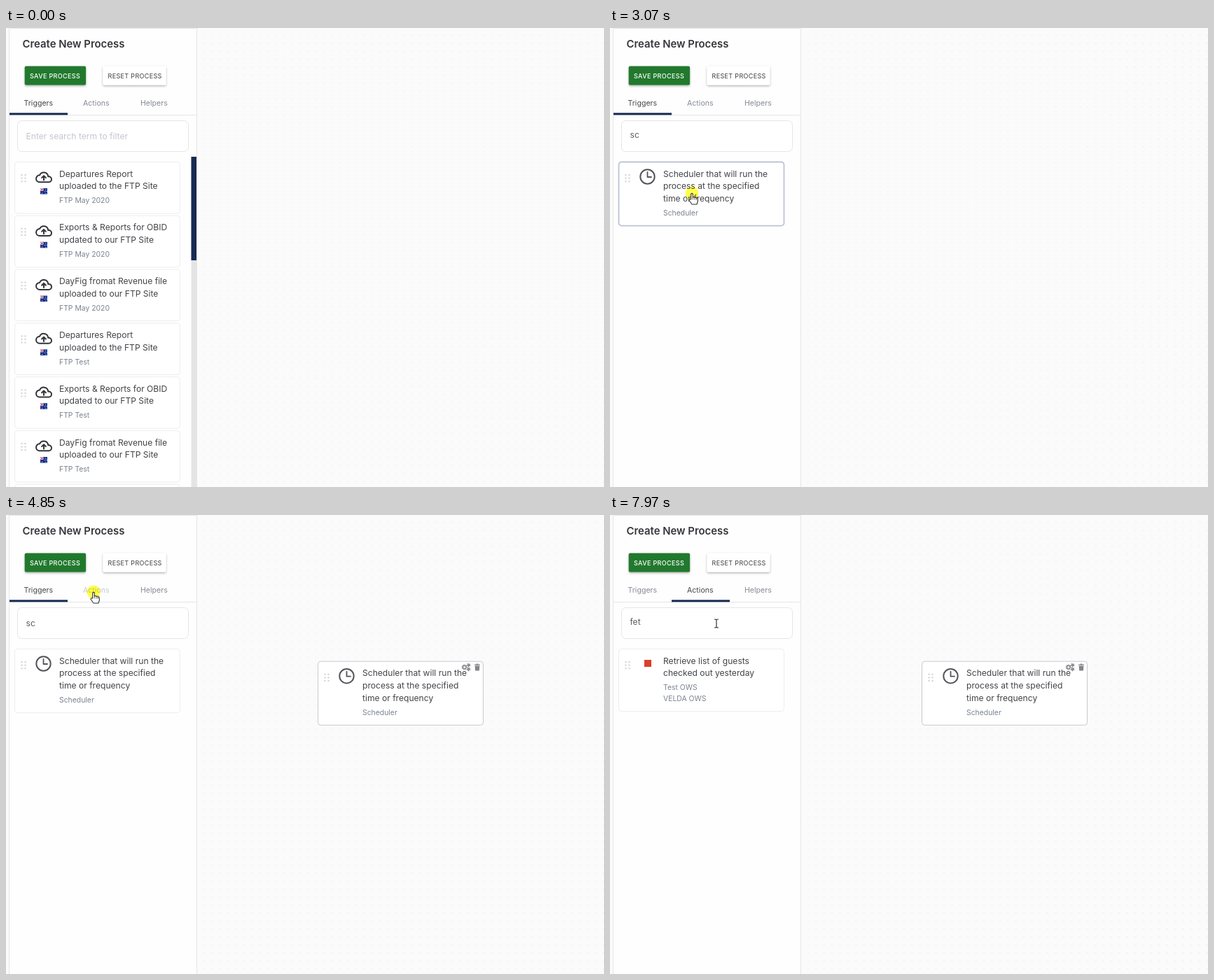
An HTML page for the animation above (8 s loop, 854 px wide and 656 px high).

```html
<!DOCTYPE html>
<html lang="en">
<head>
<meta charset="utf-8">
<title>Create New Process</title>
<style>
  html, body { margin: 0; width: 100%; height: 100%; overflow: hidden; background: #fbfbfb; }
  svg { display: block; font-family: Inter, "Open Sans", sans-serif; }
  .title { font-size: 12.1px; fill: #434448; }
  .sub { font-size: 10.4px; fill: #7b8290; }
  .tab { font-size: 10.6px; fill: #858a93; }
  .button { font-size: 9px; letter-spacing: .35px; }
  .line { fill: none; stroke-linecap: round; stroke-linejoin: round; }
</style>
</head>
<body>
<svg width="854" height="656" viewBox="0 0 854 656">
  <defs>
    <pattern id="dots" width="11.4" height="11.4" patternUnits="userSpaceOnUse">
      <rect x="8.6" y="9.4" width="1.5" height="1.5" fill="#eeeeef"/>
    </pattern>
    <filter id="lift" x="-10%" y="-20%" width="120%" height="160%">
      <feDropShadow dx="0" dy="1.5" stdDeviation="1.5" flood-opacity=".32"/>
    </filter>
  </defs>
  <rect width="854" height="656" fill="#fbfbfb"/>
  <rect x="273" width="581" height="656" fill="url(#dots)"/>
  <path d="M5 0H272V656H5z" fill="#fefefe"/>
  <path d="M4.5 656V.5H272.5V656M5 124.5H272" fill="none" stroke="#e6e6e8"/>
  <text x="23.5" y="28" font-size="14.9" font-weight="600" fill="#35363a">Create New Process</text>
  <g class="button" font-weight="500">
    <rect x="26.7" y="54.5" width="87.4" height="27" rx="2" fill="#23792f" filter="url(#lift)"/>
    <text x="34" y="72" fill="#fff">SAVE PROCESS</text>
  </g>
  <g class="button">
    <rect x="138.5" y="54.5" width="90" height="27" rx="2" fill="#fff" filter="url(#lift)"/>
    <text x="145.5" y="72" fill="#3c3c3f">RESET PROCESS</text>
  </g>
  <rect x="16.5" y="132.5" width="244" height="44" rx="6" fill="#fff" stroke="#e5e5e8"/>
  <g id="scene"></g>
</svg>
<script>
const LOOP = 8000;
const scene = document.getElementById('scene');

const text = (x, y, cls, s, extra = '') => `<text x="${x}" y="${y}" class="${cls}" ${extra}>${s}</text>`;
const rect = (x, y, w, h, fill) => `<rect x="${x}" y="${y}" width="${w}" height="${h}" fill="${fill}"/>`;
const line = (d, color, width) => `<path class="line" d="${d}" stroke="${color}" stroke-width="${width}"/>`;
const at = (x, y, body, extra = '') => `<g transform="translate(${x} ${y})" ${extra}>${body}</g>`;

// Icons are drawn where they sit in the topmost card.
const flag = rect(49, 229, 10, 8.5, '#14318c') + rect(49, 229, 4.5, 4, '#e8d5df') +
  line('M49.5 229.5l3.5 3M53 229.5l-3.5 3', '#c8324c', .9) +
  [[51, 235.6], [56.3, 230.6], [57.7, 233], [55.2, 233.2], [56.5, 236]]
    .map(([x, y]) => rect(x, y, 1, 1, '#fff')).join('');
const icons = {
  cloud: at(42, 201.3, line('M6 19h13a4 4 0 0 0 0-8h-.8A6.3 6.3 0 0 0 6.1 9A5 5 0 0 0 6 19z', '#333438', 2) +
    line('M12 16.2V10m-2.9 2.8L12 9.9l2.9 2.9', '#333438', 2)) + flag,
  clock: '<circle cx="53.5" cy="212.5" r="10.2" fill="none" stroke="#56545a" stroke-width="2"/>' +
    line('M53.5 206V213H59', '#56545a', 1.8),
  hook: line('M43.5 207.5H64.5V220.5H43.5zM43.5 211H50M58 211H64.5M49.5 207v-2.5h8.5v2.5', '#36373b', 1.7) +
    line('M54 208v5a2.8 2.8 0 1 1-3.5 2.5', '#36373b', 1.6),
  badge: rect(49, 207, 10, 10, '#d8402c')
};
const grip = [0, 1, 2, 3, 4, 5]
  .map(i => rect(21.5 + i % 2 * 5, 209 + (i >> 1) * 4.6, 2, 2, '#cfcfd3')).join('');

const item = (icon, titles, subs) => ({
  icon, titles, subs, height: 23.3 + 17.6 * titles.length + 15.5 * subs.length
});
const uploads = ['FTP May 2020', 'FTP Test', 'FTP Test'].flatMap(site => [
  item('cloud', ['Departures Report', 'uploaded to the FTP Site'], [site]),
  item('cloud', ['Exports &amp; Reports for OBID', 'updated to our FTP Site'], [site]),
  item('cloud', ['DayFig fromat Revenue file', 'uploaded to our FTP Site'], [site])
]).slice(0, 7);
const scheduler = item('clock', ['Scheduler that will run the', 'process at the specified', 'time or frequency'], ['Scheduler']);
const publish = item('hook', ['Publish Event'], ['Test Webhook', 'mlinkers Webhook Subscriber']);
const guests = (...titles) => item('badge', titles, ['Test OWS', 'VELDA OWS']);
const checkedOut = guests('Retrieve list of guests', 'checked out yesterday');
const broad = [
  checkedOut, guests('Retrieve list of guests', 'checked in yesterday'),
  guests('Retrieve profile of guest', 'for a reservation'), guests('Find a reservation', 'for today'),
  guests('Retrieve list of guests', 'arriving today'), guests('Update profile of guest', 'after check out')
];

function listAt(t) {
  if (t < 1490) return uploads;
  if (t < 5080) return [scheduler];
  if (t < 6890) return [publish, checkedOut];
  return t < 7120 ? broad : [checkedOut];
}

function card({ icon, titles, subs, height }, border = '#ededf0', width = 1) {
  const subTop = 212.5 + 17.7 * (titles.length - 1) + 20;
  return `<rect x="12.5" y="191.5" width="236" height="${height - .5}" rx="4" fill="#fff" stroke="${border}" stroke-width="${width}"/>` +
    grip + icons[icon] +
    titles.map((s, i) => text(76, 212.5 + 17.7 * i, 'title', s)).join('') +
    subs.map((s, i) => text(76, subTop + 15.5 * i, 'sub', s)).join('');
}

function list(t, pointer) {
  const items = listAt(t);
  let y = 191, hovered = false, out = '';
  for (const it of items) {
    const over = pointer && !dragging(t) && pointer.x > 12 && pointer.x < 248 && pointer.y > y && pointer.y < y + it.height;
    hovered ||= over;
    out += at(0, y - 191, over ? card(it, '#bfc3d6', 1.8) : card(it));
    y += it.height + 2.8;
  }
  if (items.length > 2) out += rect(264.5, 184, 7.5, 472, '#e4e4e6') + rect(264.5, 184, 7.5, 148, '#172b54');
  return [out, hovered];
}

// Pointer runs: start, end, steps, then the three points of a quadratic curve.
const runs = [
  [230, 870, 9, 790, 655, 230, 255, 121, 163],
  [1950, 2600, 9, 121, 163, 140, 195, 119, 238],
  [2750, 2750, 1, 119, 238, 118, 237, 117, 236],
  [3145, 3520, 6, 117, 236, 330, 340, 551, 252],
  [3910, 4700, 11, 551, 252, 250, -20, 125, 110],
  [4925, 5640, 10, 125, 110, 140, 95, 128, 162],
  [7970, 7970, 1, 128, 162, 140, 158, 152, 155]
];
const ease = p => p * p * (3 - 2 * p);
const dragging = t => t >= 3145 && t < 3690;

function pointerAt(t) {
  const run = runs.filter(r => t >= r[0]).pop();
  if (!run) return null;
  const [a, b, n, x0, y0, x1, y1, x2, y2] = run;
  const done = t >= b ? n : Math.floor((t - a) / (b - a) * (n - 1)) + 1;
  const p = ease(done / n), q = 1 - p;
  const mix = (u, v, w) => q * q * u + 2 * p * q * v + p * p * w;
  return { x: mix(x0, x1, x2), y: mix(y0, y1, y2) };
}

const shapes = {
  arrow: '<path d="M0 0V12.5L3 9.8 5 14.3 7 13.4 5 9.2H9z" fill="#fff" stroke="#333" stroke-width="1"/>',
  hand: '<path d="M-1.3 9V1.2Q0-.5 1.3 1.2V6Q3 4.8 4 6.3Q5.6 5.4 6.4 7Q8.3 6.5 8.4 8.5V11.5L7 16H0L-4 10.3Q-3.6 8-1.3 9z" fill="#fff" stroke="#333" stroke-width="1.1" stroke-linejoin="round"/>' +
    line('M1.3 6v3M4 6.5v2.7M6.4 7.3v2.2', '#333', .8),
  beam: line('M-2.5-6Q0-6 0-5Q0-6 2.5-6M0-5V5M-2.5 6Q0 6 0 5Q0 6 2.5 6', '#333', 1.2)
};

function cursor(t, { x, y }, overCard) {
  const pressed = t >= 3070 && t < 3145 || t >= 4850 && t < 4925;
  const inField = x > 16 && x < 261 && y > 132 && y < 177;
  const onTab = x > 5 && x < 272 && y > 92 && y < 124;
  const kind = inField ? 'beam' : overCard || onTab ? 'hand' : 'arrow';
  const glow = pressed ? '<circle r="9.5" fill="#ffff4d" style="mix-blend-mode:multiply"/>' : '';
  return at(x, y, glow) + at(x, y, shapes[dragging(t) ? 'arrow' : kind]);
}

function tabs(t, pointer) {
  const slide = ease(Math.min(1, Math.max(0, (t - 4925) / 300)));
  const active = t < 4925 ? 0 : 1;
  const hover = pointer && active === 0 && pointer.y > 92 && pointer.y < 124 && pointer.x > 88 && pointer.x < 171;
  return [[25.5, 'Triggers'], [110, 'Actions'], [192, 'Helpers']].map(([x, s], i) =>
    text(x, 110.5, 'tab', s, i === active ? 'style="fill:#46474b"' : i === 1 && hover ? 'opacity=".45"' : '')
  ).join('') + rect(5 + 83 * slide, 121.3, 83, 3, '#172b54');
}

function search(t) {
  const focused = t >= 1100 && t < 3145 || t >= 5710;
  const value = t < 1410 ? '' : t < 1490 ? 's' : t < 6890 ? 'sc' : t < 7040 ? 'f' : t < 7120 ? 'fe' : 'fet';
  const selected = t >= 6510 && t < 6890;
  const caret = t >= 1100 && t < 1990 || t >= 5710 && t < 6110 || t >= 6890 && t < 7670;
  const end = 29 + { '': 0, s: 6, sc: 13.5, f: 4.5, fe: 11.5, fet: 15.5 }[value];
  const y = focused ? 156.8 : 159.3;
  const fill = selected ? '#fff' : value ? '#5c5d61' : '#c3c6cd';
  return (selected ? rect(29, 144, 13.5, 17, '#3390f5') : '') +
    text(28.5, y, 'title', value || 'Enter search term to filter', `style="fill:${fill}"`) +
    (t >= 5960 && t < 6890 ? line('M29 160l1.5-1.5 1.5 1.5 1.5-1.5 1.5 1.5 1.5-1.5 1.5 1.5 1.5-1.5 1.5 1.5 1.5-1.5', '#e04848', .9) : '') +
    (caret ? rect(end, 144, 1, 17, '#666') : '');
}

const gear = (x, y, r) =>
  `<g fill="none" stroke="#85868b"><circle cx="${x}" cy="${y}" r="${r}" stroke-width="1.5"/>` +
  `<circle cx="${x}" cy="${y}" r="${r + 1.1}" stroke-width="1.3" stroke-dasharray="1.3 1.3"/></g>`;
const tools = gear(654.7, 217.5, 2.3) + gear(660.6, 214.6, 1.1) + gear(660.6, 220.4, 1.1) +
  '<path d="M669 213.5h2.3l.7-1h2l.7 1h2.3v1.3h-8zM669.6 215.5h6.8l-.5 7h-5.8z" fill="#85868b"/>';

function placed(t, pointer) {
  if (dragging(t)) return at(pointer.x - 117, pointer.y - 234, card(scheduler, '#c3c7d4'), 'opacity=".65"');
  return t < 3690 ? '' : at(433, 17.7, card(scheduler, '#c7cad3')) + tools;
}

function draw(t) {
  const pointer = pointerAt(t);
  const [cards, overCard] = list(t, pointer);
  return tabs(t, pointer) + search(t) + cards + placed(t, pointer) +
    (pointer ? cursor(t, pointer, overCard) : '');
}

let shown = '';
function tick() {
  const next = draw(performance.now() % LOOP);
  if (next !== shown) scene.innerHTML = shown = next;
  requestAnimationFrame(tick);
}
tick();
</script>
</body>
</html>
```
